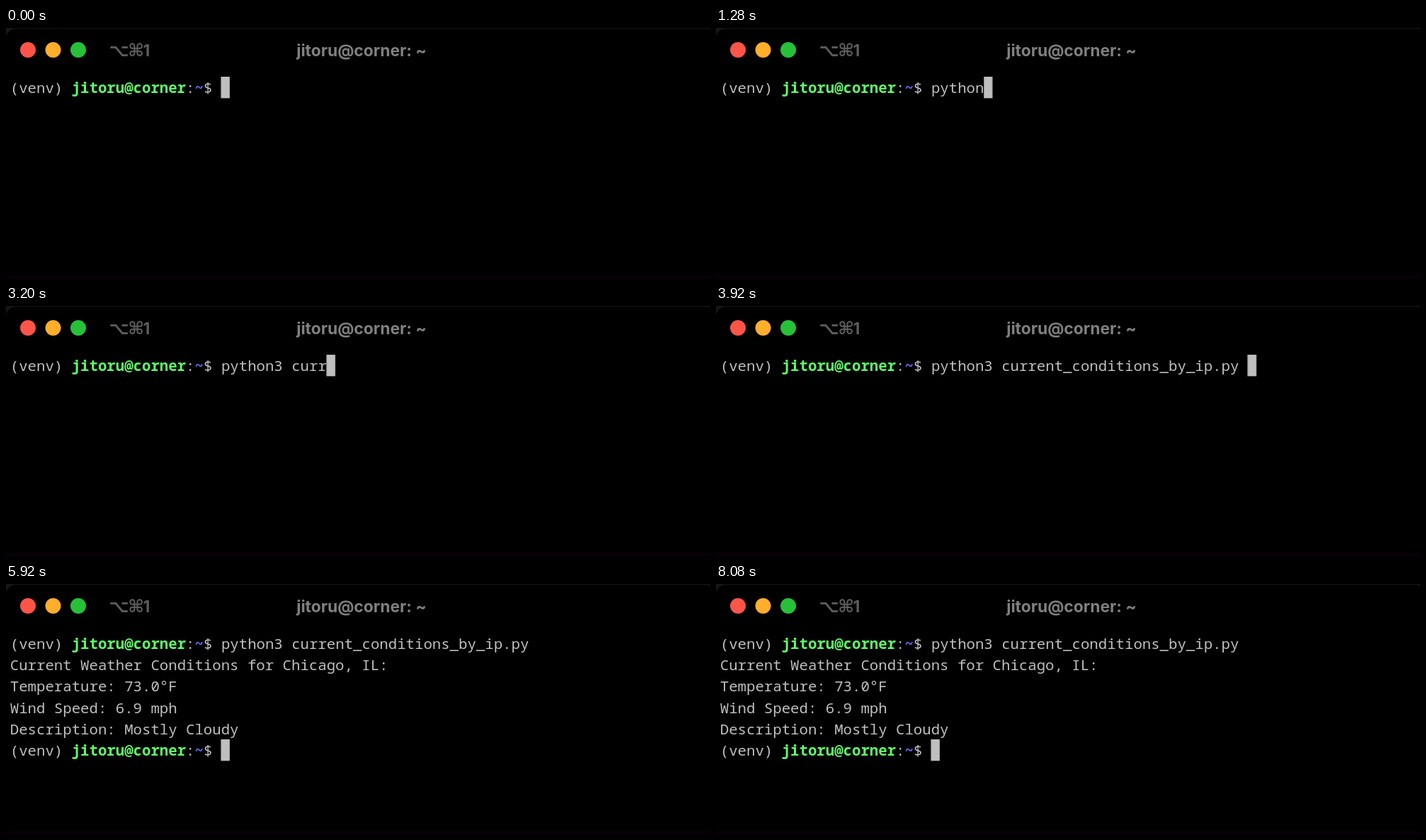
An HTML page for the animation above (8160 ms loop, 994 by 354 pixels).

```html
<!DOCTYPE html>
<html lang="en">
<head>
<meta charset="utf-8">
<title>Terminal</title>
<style>
  html, body { margin: 0; width: 100%; height: 100%; overflow: hidden; background: #000; }
  svg { display: block; width: 994px; height: 354px; }
  text { white-space: pre; }
  .title { font: 700 22.8px Inter, sans-serif; fill: #808080; text-anchor: middle; }
  .tab { font: 700 22.8px Inter, sans-serif; fill: #5c5c5c; }
  .keys { font: 700 24.5px "DejaVu Sans", sans-serif; letter-spacing: -1.5px; }
  .term { font: 400 20.7px "Noto Sans Mono", "DejaVu Sans Mono", monospace; fill: #bfbfbf; }
  .user { font-weight: 700; fill: #5ffa68; }
  .path { font-weight: 700; fill: #6871ff; }

  /* One character cell is 12.42 x 30.2 px. */
  .cursor { animation: type 8160ms step-end infinite; }
  .output { animation: print 8160ms step-end infinite; }

  @keyframes type {
    0% { transform: translate(calc(24 * 12.42px), 0); }
    3.92% { transform: translate(calc(25 * 12.42px), 0); }
    5.88% { transform: translate(calc(26 * 12.42px), 0); }
    7.84% { transform: translate(calc(27 * 12.42px), 0); }
    9.8% { transform: translate(calc(28 * 12.42px), 0); }
    12.74% { transform: translate(calc(29 * 12.42px), 0); }
    15.68% { transform: translate(calc(30 * 12.42px), 0); }
    17.64% { transform: translate(calc(31 * 12.42px), 0); }
    19.6% { transform: translate(calc(32 * 12.42px), 0); }
    29.41% { transform: translate(calc(33 * 12.42px), 0); }
    31.37% { transform: translate(calc(34 * 12.42px), 0); }
    33.33% { transform: translate(calc(35 * 12.42px), 0); }
    35.29% { transform: translate(calc(36 * 12.42px), 0); }
    /* tab completion, enter, new prompt */
    42.15% { transform: translate(calc(60 * 12.42px), 0); }
    65.68% { transform: translate(0, 30.2px); }
    68.62%, 100% { transform: translate(calc(24 * 12.42px), calc(5 * 30.2px)); }
  }
  @keyframes print {
    0% { visibility: hidden; }
    68.62%, 100% { visibility: visible; }
  }
</style>
</head>
<body>
<svg viewBox="0 0 994 354">
  <defs>
    <text id="prompt" x="5.8">(venv) <tspan class="user">jitoru@corner</tspan>:<tspan class="path">~</tspan>$</text>
  </defs>

  <rect width="994" height="354" fill="#161616"/>
  <rect y="1" width="1002" height="380" rx="14" fill="#000"/>
  <rect y="350" width="994" height="4" fill="#090009"/>

  <circle cx="31" cy="31" r="11" fill="#ff5449"/>
  <circle cx="66.5" cy="31" r="11" fill="#ffae2b"/>
  <circle cx="102" cy="31" r="11" fill="#27c139"/>
  <text class="tab" x="145.5" y="40"><tspan class="keys">⌥⌘</tspan>1</text>
  <text class="title" x="502" y="40">jitoru@corner: ~</text>

  <g class="term">
    <use href="#prompt" y="92"/>
    <text x="303.9" y="92">python3 current_conditions_by_ip.py</text>
    <g class="output">
      <text x="5.8" y="122.2">Current Weather Conditions for Chicago, IL:</text>
      <text x="5.8" y="152.4">Temperature: 73.0°F</text>
      <text x="5.8" y="182.6">Wind Speed: 6.9 mph</text>
      <text x="5.8" y="212.8">Description: Mostly Cloudy</text>
      <use href="#prompt" y="243"/>
    </g>
  </g>

  <!-- The dark part hides whatever has not been typed yet. -->
  <g class="cursor">
    <rect x="5.4" y="67" width="900" height="33" fill="#000"/>
    <rect x="5.4" y="69" width="12.4" height="30.4" fill="#bfbfbf"/>
  </g>
</svg>
</body>
</html>
```
